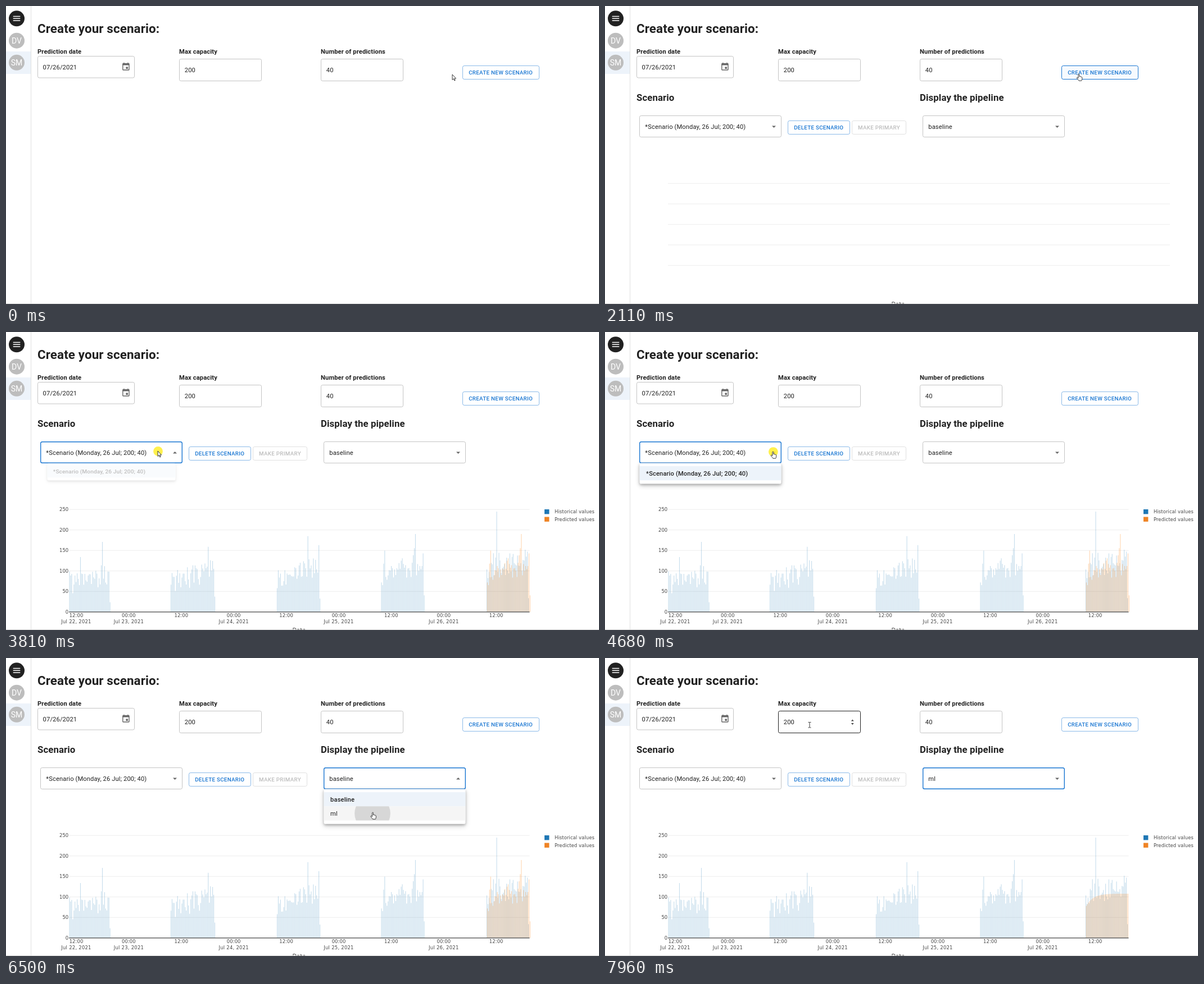
Recreate the animation shown at these times as an HTML page. Size 1055 px wide and 531 px high, loop 8000 ms.

```html
<!DOCTYPE html>
<html lang="en">
<head>
<meta charset="utf-8">
<title>Create your scenario</title>
<style>
html, body { margin: 0; height: 100%; overflow: hidden; background: #fff; }
svg { display: block; width: 1055px; height: 531px; }
text { font: 11.2px Roboto, sans-serif; letter-spacing: .105px; fill: #212121; white-space: pre; }
.h1 { font-size: 22.4px; font-weight: 700; }
.h2 { font-size: 16.8px; font-weight: 700; }
.label { font-weight: 700; }
.selected { font-weight: 500; }
.button { font-size: 9.8px; font-weight: 500; letter-spacing: .28px; }
.avatar { font-size: 14px; letter-spacing: 0; fill: #fff; text-anchor: middle; }
.axis { font: 8.4px "DejaVu Sans", sans-serif; fill: #444; }
.mid { text-anchor: middle; }
.end { text-anchor: end; }
.day { letter-spacing: .28px; text-anchor: middle; }
.title { font-size: 9.8px; }
.paper { fill: #fff; filter: drop-shadow(0 2px 2px rgba(0,0,0,.24)) drop-shadow(0 3px 4px rgba(0,0,0,.2)); }
</style>
</head>
<body>
<svg id="stage" viewBox="0 0 1055 531"></svg>
<script>
const LOOP = 8000, BLUE = '#1976d2', DARK = '#212121', GRAY = '#c4c4c4';
const stage = document.getElementById('stage');

// Pointer path: [time, x, y]
const PATH = [[180, 794, 122], [1020, 843, 121], [2240, 843, 121], [2930, 491, 188], [3070, 428, 204],
  [3540, 270, 212], [4640, 270, 212], [5200, 664, 226], [5360, 664, 226], [5840, 652.5, 275],
  [7130, 652.5, 275], [7890, 364, 119]];

const PRESS = { create: 1258, scenario: 3755, away: 4600, pipeline: 5248, ml: 6370 };
const CLOSE1 = 4660, CLOSE2 = 6520, CONTENT = 2110, DATA = 2310, ML_DATA = 6800;

const BOX = {
  date: [56.5, 89.5, 172, 38.5], capacity: [308.5, 94.5, 146, 39], count: [560.5, 94.5, 146, 39],
  create: [812.5, 106.5, 136, 24], remove: [325.5, 204.5, 110, 24], primary: [439.5, 204.5, 96, 24],
  scenario: [61.5, 195.5, 252, 38], pipeline: [565.5, 195.5, 252, 38]
};

const clamp = v => Math.max(0, Math.min(1, v));

// cubic-bezier(.4, 0, .2, 1)
function ease(x) {
  x = clamp(x);
  let lo = 0, hi = 1, s = .5;
  for (let i = 0; i < 20; i++) {
    s = (lo + hi) / 2;
    const r = 1 - s;
    if (1.2 * r * r * s + .6 * r * s * s + s * s * s < x) lo = s; else hi = s;
  }
  return s * s * (3 - 2 * s);
}

const ramp = (t, from, length) => ease((t - from) / length);
const fade = (t, from, to) => ramp(t, from, 250) - ramp(t, to, 250);

function pointerAt(t) {
  const i = PATH.findIndex(q => t < q[0]);
  const q = PATH.at(i), p = i > 0 ? PATH[i - 1] : q;
  const k = p === q ? 0 : (t - p[0]) / (q[0] - p[0]);
  return { x: p[1] + (q[1] - p[1]) * k, y: p[2] + (q[2] - p[2]) * k };
}

const inside = (p, [x, y, w, h]) => p.x >= x && p.x <= x + w && p.y >= y && p.y <= y + h;

// Drawing helpers
const text = (s, x, y, cls = '', attr = '') => `<text x="${x}" y="${y}" class="${cls}" ${attr}>${s}</text>`;
const rect = ([x, y, w, h], attr) => `<rect x="${x}" y="${y}" width="${w}" height="${h}" ${attr}/>`;
const path = (d, attr = '') => `<path d="${d}" ${attr}/>`;
const frame = (box, color, width = 1) => rect(box, `rx="2.8" fill="none" stroke="${color}" stroke-width="${width}"`);

function button(box, label, hover, inner = '') {
  return rect(box, `rx="2.8" fill="${BLUE}" fill-opacity="${.04 * hover}"`) + inner +
    rect(box, `rx="2.8" fill="none" stroke="${BLUE}" stroke-opacity="${.5 + .5 * hover}"`) +
    text(label, box[0] + 10.7, box[1] + 15.3, 'button', `style="fill:${BLUE}"`);
}

function ripple(t, from, up, x, y, size, color, clip) {
  if (t < from || t > up + 550) return '';
  const p = ramp(t, from, 550), alpha = (.1 + .2 * p) * (1 - ramp(t, up, 550));
  return `<clipPath id="clip">${rect(clip, 'rx="2"')}</clipPath>
    <circle cx="${x}" cy="${y}" r="${size * p}" fill="${color}" opacity="${alpha}" clip-path="url(#clip)"/>`;
}

const field = (box, value, hover) =>
  frame(box, hover ? DARK : GRAY) + text(value, box[0] + 9.3, box[1] + 23.7);

function select(box, value, open, focus, hover) {
  const [x, y, w, h] = box, ax = x + w - 13, ay = y + 19.5;
  const arrow = open ? `M${ax - 3.5} ${ay + 1.5}h7l-3.5-3.5z` : `M${ax - 3.5} ${ay - 1.5}h7l-3.5 3.5z`;
  const border = focus ? frame([x + .2, y + .2, w - .4, h - .4], BLUE, 1.4) : frame(box, hover ? DARK : GRAY);
  return border + text(value, x + 9.8, y + 23) + path(arrow, 'fill="#666"');
}

const ROW = 25.2, PAD = 5.6;
const itemBox = ([x, y, w, h], i) => [x, y + h + PAD + i * ROW, w, ROW];

function menu(t, anchor, items, open, close, p, effect = '') {
  const [x, y, w, h] = anchor, height = 2 * PAD + items.length * ROW;
  const c = height / .7 / 36, length = (4 + 15 * c ** .25 + c / 5) * 10;
  if (t < open || t > close + length) return '';
  const alpha = ramp(t, open, length) - ramp(t, close, length);
  const grow = ramp(t, open, length * .666) - ramp(t, close + length * .333, length * .667);
  const sx = .75 + .25 * grow, sy = .5625 + .4375 * grow, cx = x + w / 2, top = y + h;
  const rows = items.map((s, i) => {
    const b = itemBox(anchor, i), hover = inside(p, b) && t < close;
    return rect(b, `fill="${i ? (hover ? '#f5f5f5' : '#fff') : (hover ? '#e3effa' : '#edf3fa')}"`);
  }).join('');
  const labels = items.map((s, i) => text(s, x + 11.6, top + PAD + i * ROW + 17, i ? '' : 'selected')).join('');
  return `<g opacity="${alpha}" transform="translate(${cx} ${top}) scale(${sx} ${sy}) translate(${-cx} ${-top})">
    ${rect([x, top, w, height + .6], 'rx="2.8" class="paper"')}${rows}${effect}${labels}</g>`;
}

// Chart: each day has a start, a bar count and one highest bar; the rest is seeded noise
const DAYS = [
  { x: 113, bars: 38, top: [30, 171] }, { x: 293.5, bars: 41, top: [34, 159] },
  { x: 482.5, bars: 40, top: [28, 185] }, { x: 668, bars: 40, top: [31, 190] },
  { x: 855.5, bars: 39, top: [9, 245] }
];
const PITCH = 1.95;
const noise = n => { const v = Math.sin(n) * 43758.5; return v - Math.floor(v); };

function dayValues({ bars, top }, d) {
  return Array.from({ length: bars }, (_, i) => {
    if (i === top[0]) return top[1];
    const seed = i * 127.1 + d * 311.7, k = i / bars;
    const spike = noise(seed + 5) > .9 ? 35 : 0;
    const edge = i === bars - 1 ? .3 : 1;
    return edge * (64 + 9 * d + 30 * k + 54 * (noise(seed + 1) - .5) + spike);
  });
}
const values = DAYS.map(dayValues);
const level = v => 498.8 - v * .7304;
const bars = (x0, list) => list.map((v, i) => `M${(x0 + i * PITCH).toFixed(2)} 498.8V${level(v).toFixed(1)}`).join('');
const history = path(DAYS.map((d, i) => bars(d.x, values[i])).join(''), 'stroke="#1f77b4" stroke-opacity=".25" stroke-width="1.1"');
const forecast = list => path(bars(DAYS[4].x + .9, list), 'stroke="#ff7f0e" stroke-opacity=".32" stroke-width="1.1"');
const baseline = forecast(values[3]);
const learned = forecast(values[4].map((_, i) => 108 - 30 * Math.exp(-i / 6)));

const gridTo = x => path([50, 100, 150, 200, 250].map(v => `M112 ${level(v)}H${x}`).join(''), 'stroke="#eee"');
const axisTitle = text('Date', 521.5, 535, 'axis title mid');

function axes() {
  let out = gridTo(931.5);
  for (let v = 0; v <= 250; v += 50) out += text(v, 111.3, level(v) + 3, 'axis end');
  for (let i = 0; i < 9; i++) {
    const x = 125 + i * 93.4;
    out += text(i % 2 ? '00:00' : '12:00', x, 508.3, 'axis mid');
    if (i % 2 || !i) out += text(`Jul ${22 + (i + 1) / 2 | 0}, 2021`, x, 519.3, 'axis day');
  }
  return out + axisTitle +
    rect([958, 316, 8.4, 8.4], 'fill="#1f77b4"') + text('Historical values', 976, 323.3, 'axis') +
    rect([958, 329.5, 8.4, 8.4], 'fill="#ef8426"') + text('Predicted values', 976, 336.8, 'axis');
}
const chartAxes = axes(), zeroLine = path('M112 498.8H931.5', 'stroke="#444" stroke-width="1.3"');

const page = rect([0, 81, 44, 40], 'fill="#edf3fa"') + path('M44.5 0V531', 'stroke="#e0e0e0"') +
  '<circle cx="19" cy="22.3" r="14" fill="#212121"/>' +
  path('M12.7 18.5h12.6M12.7 22.3h12.6M12.7 26.1h12.6', 'stroke="#fff" stroke-width="1.5"') +
  [['DV', 61.7], ['SM', 100.8]].map(([s, y]) =>
    `<circle cx="19" cy="${y}" r="14" fill="#bdbdbd"/>` + text(s, 19, y + 5, 'avatar')).join('') +
  text('Create your scenario:', 56, 48.3, 'h1') +
  text('Prediction date', 56, 84.8, 'label') + text('Max capacity', 308, 84.8, 'label') +
  text('Number of predictions', 560, 84.8, 'label') +
  frame(BOX.date, GRAY) + text('07/26/2021', 65.6, 112.6) +
  path('M17 12h-5v5h5zM16 1v2H8V1H6v2H5C3.9 3 3 3.9 3 5v14c0 1.1.9 2 2 2h14c1.1 0 2-.9 2-2V5c0-1.1-.9-2-2-2h-1V1zM19 19H5V8h14z',
    'transform="translate(205 100) scale(.7)" fill="#666" fill-rule="evenodd"');

const headings = text('Scenario', 56, 168.5, 'h2') + text('Display the pipeline', 560, 168.5, 'h2') +
  frame(BOX.primary, '#e0e0e0') + text('MAKE PRIMARY', 450, 219.8, 'button', 'style="fill:#bdbdbd"');

const outline = 'fill="#fff" stroke="#222" stroke-width=".9"';
const CURSORS = {
  arrow: path('M0 0V9.6L2.2 7.6 3.8 11 5.2 10.4 3.7 7.1H6.6z', outline),
  hand: path('M-1 1.2c0-1.4 2-1.4 2 0v3.6c.4-.8 1.7-.6 1.8.3.5-.7 1.6-.3 1.6.5.6-.4 1.4 0 1.4.8v2.4c0 2-.8 2.6-1 3.4H0c-.5-1.4-2-2.4-3.4-4.4-.7-1.2.5-1.9 1.3-1.2l1.1 1z', outline),
  beam: path('M-2.5-4.5h2L0-4 .5-4.5h2M0-4V4.5M-2.5 5h2L0 4.5 .5 5h2', outline)
};

function pointer(t, p, open1, open2) {
  let kind = 'arrow';
  const over = (...names) => names.some(n => inside(p, BOX[n]));
  if (open2) {
    if ([0, 1].some(i => inside(p, itemBox(BOX.pipeline, i)))) kind = 'hand';
  } else if (!open1) {
    if (over('create') || t >= CONTENT && over('remove', 'scenario', 'pipeline')) kind = 'hand';
    else if (over('date', 'capacity', 'count')) kind = 'beam';
  }
  const pressed = Object.values(PRESS).some(d => t >= d && t < d + 90);
  return (pressed ? `<circle cx="${p.x + .5}" cy="${p.y + .5}" r="8.4" fill="#ffee2e" opacity=".85"/>` : '') +
    `<g transform="translate(${p.x} ${p.y})">${CURSORS[kind]}</g>`;
}

function scene(t) {
  const p = pointerAt(t);
  const open1 = t >= PRESS.scenario && t < CLOSE1, open2 = t >= PRESS.pipeline && t < CLOSE2;
  const overCapacity = inside(p, BOX.capacity);
  let out = page + field(BOX.capacity, 200, overCapacity) + field(BOX.count, 40, inside(p, BOX.count));
  if (overCapacity) out += path('M437.8 112.6h5l-2.5-3zM437.8 116h5l-2.5 3z', 'fill="#444"');
  out += button(BOX.create, 'CREATE NEW SCENARIO', fade(t, 490, 2340),
    ripple(t, PRESS.create, 1350, 843, 121, 108, BLUE, BOX.create));

  if (t >= CONTENT) {
    const name = '*Scenario (Monday, 26 Jul; 200; 40)';
    out += headings + button(BOX.remove, 'DELETE SCENARIO', fade(t, 3060, 3376)) +
      select(BOX.scenario, name, open1, t >= PRESS.scenario && t < PRESS.pipeline, inside(p, BOX.scenario)) +
      select(BOX.pipeline, t < CLOSE2 ? 'baseline' : 'ml', open2, t >= PRESS.pipeline, !open1 && inside(p, BOX.pipeline));
    out += t < DATA ? gridTo(1005) + axisTitle
      : chartAxes + history + (t < ML_DATA ? baseline : learned) + zeroLine;
    out += menu(t, BOX.scenario, [name], PRESS.scenario, CLOSE1, p) +
      menu(t, BOX.pipeline, ['baseline', 'ml'], PRESS.pipeline, CLOSE2, p,
        ripple(t, PRESS.ml, CLOSE2, 652, 277, 152, '#222', itemBox(BOX.pipeline, 1)));
  }
  return out + path('M0 530.5H1055', 'stroke="#d0d0d0"') + pointer(t, p, open1, open2);
}

const start = performance.now();
function tick() {
  stage.innerHTML = scene((performance.now() - start) % LOOP);
  requestAnimationFrame(tick);
}
tick();
</script>
</body>
</html>
```
